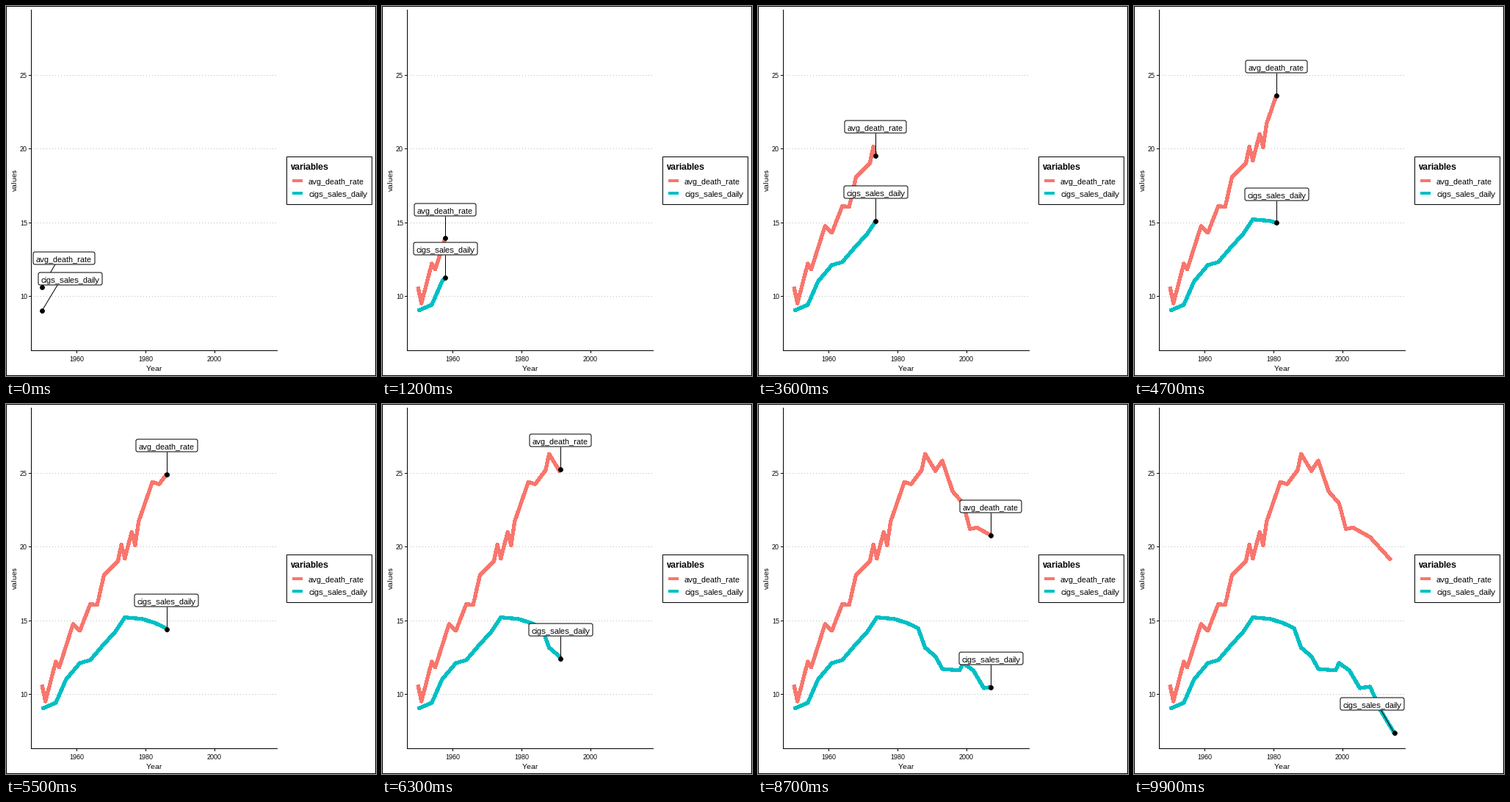
Recreate the animation shown at these times as a matplotlib script. Size 504 by 504 pixels, loop 10000 ms.

```python
import numpy as np
import matplotlib.pyplot as plt
from matplotlib.animation import FuncAnimation
from matplotlib.patches import FancyBboxPatch, Rectangle

plt.rcParams.update({
    "font.family": "Liberation Sans",
    "text.hinting": "native",
    "text.hinting_factor": 1,
    "toolbar": "None",
})

SIZE, FRAMES = 504, 100
RED, TEAL = "#F8766D", "#00BFC4"
START, END = 1950, 2015

# turning points of each curve: (years since START, value)
DEATHS = [(0, 10.6), (1, 9.5), (4, 12.2), (5, 11.8), (9, 14.75), (11, 14.3),
          (14, 16.1), (16, 16.05), (18, 18.1), (22, 19), (23, 20.15),
          (24, 19.2), (26, 21), (27, 20.1), (28, 21.7), (32, 24.4),
          (34, 24.25), (37, 25.2), (38, 26.3), (41, 25.15), (43, 25.85),
          (46, 23.75), (49, 22.95), (51, 21.2), (53, 21.3), (58, 20.65),
          (64, 19.1)]
SALES = [(0, 9), (4, 9.4), (7, 11), (11, 12.1), (14, 12.3), (18, 13.4),
         (21, 14.15), (24, 15.2), (29, 15.1), (33, 14.8), (36, 14.45),
         (38, 13.15), (41, 12.55), (43, 11.7), (48, 11.6), (49, 12.1),
         (52, 11.6), (55, 10.4), (58, 10.5), (61, 8.9), (65, 7.35)]

LEFT, RIGHT = 37, 368       # horizontal limits for the labels
LIFT, HALF_H = 39.3, 8.5    # label height above its dot, half box height
ASPECT = 464 / 336          # panel height over width


def px(year):
    return 96 + (year - 1960) * 4.7


def py(value):
    return 395 - (value - 10) * 20.06


fig = plt.figure(figsize=(SIZE / 72, SIZE / 72), dpi=72, facecolor="white")
ax = fig.add_axes([0, 0, 1, 1])
ax.set(xlim=(0, SIZE), ylim=(SIZE, 0))
ax.axis("off")


def line(x, y, color="black", lw=1, z=1, cap="projecting", **kw):
    return ax.plot(x, y, color=color, lw=lw, zorder=z,
                   solid_capstyle=cap, **kw)[0]


def text(x, y, s, size, ha="center", z=2, **kw):
    kw.setdefault("va", "baseline")
    return ax.text(x, y, s, fontsize=size, ha=ha, zorder=z, **kw)


def frame_box(x, y, w, h):
    ax.add_patch(Rectangle((x, y), w, h, fc="none", ec="black", lw=1))


class Series:
    def __init__(self, name, points, color, width, z):
        years, values = np.transpose(points)
        self.last = START + years[-1]
        self.years = np.arange(START, self.last + 1)
        self.values = np.interp(self.years - START, years, values)
        self.width = width
        self.path = line([], [], color, 4.2, 3, "butt", antialiased=False,
                         solid_joinstyle="round")
        self.dot = line([], [], z=4, marker="o", ms=6, mew=0.8, ls="none")
        self.lead = line([], [], z=5, cap="butt")
        self.box = FancyBboxPatch(
            (0, 0), width, 2 * HALF_H, fc="white", ec="black", lw=1, zorder=z,
            boxstyle="round,pad=0,rounding_size=2.5")
        ax.add_patch(self.box)
        self.label = text(0, 0, name, 11, z=z + 0.5)

    def at(self, year):
        return px(year), py(np.interp(year, self.years, self.values))

    def home(self, year):
        x, y = self.at(year)
        half = self.width / 2
        return [np.clip(x, LEFT + half, RIGHT - half), y - LIFT]

    def draw(self, year, spot):
        alive = year <= self.last + 1e-9
        past = self.years < year
        x, y = self.at(year)
        xs, ys = px(self.years[past]), py(self.values[past])
        if alive:
            xs, ys = np.append(xs, x), np.append(ys, y)
        self.path.set_data(xs, ys)
        for part in (self.dot, self.lead, self.box, self.label):
            part.set_visible(alive)
        if not alive:
            return
        cx, cy = spot
        self.dot.set_data([x], [y])
        left, top = round(cx - self.width / 2), round(cy - HALF_H)
        bottom = top + 2 * HALF_H
        # the leader meets the box between the dot and the box centre
        near = np.clip(x, left, left + self.width)
        drop = y - bottom
        pull = (np.hypot((x - near) * ASPECT, drop)
                / max(np.hypot((cx - x) * ASPECT, drop), 1e-6))
        self.lead.set_data([x, near + (cx - near) * min(pull, 1)], [y, bottom])
        self.box.set_bounds(left, top, self.width, 2 * HALF_H)
        self.label.set_position((left + self.width / 2, top + 14))


def place(year):
    """Label centres, kept clear of each other and of the upper dot."""
    a, b = deaths.home(year), sales.home(year)
    if year > deaths.last:
        return a, b
    dot_x, dot_y = deaths.at(year)
    gap = dot_y - b[1]
    if abs(gap) < 5:
        b[0] = dot_x + 5 + sales.width / 2
    elif 0 < gap < 11:
        b[0] += 7
        b[1] = dot_y - 11
    elif -14 < gap < 0:
        b[1] = dot_y + 14
    overlap = 2 * HALF_H + 1 - (b[1] - a[1])
    if overlap > 0:
        a[1] -= overlap / 2
        b[1] += overlap / 2
    return a, b


# axes and grid
frame_box(0, 0, SIZE - 1, SIZE - 1)
line([34, 34], [5, 469])
line([34, 369], [469, 469])
for v in (10, 15, 20, 25):
    y = round(py(v))
    line([35, 368], [y, y], "#BEBEBE", ls=(0.5, (1, 3)), dash_capstyle="butt")
    line([31, 33], [y, y])
    text(29, y + 4, str(v), 9.4, "right")
for year in (1960, 1980, 2000):
    line([px(year)] * 2, [470, 472])
    text(px(year), 484, str(year), 9.4)
text(202, 497, "Year", 10)
text(17, 236.5, "values", 10, "right", va="center", rotation=90)

# legend
frame_box(382, 205, 116, 65)
text(388, 223, "variables", 12, "left", weight="bold")
for y, name, color in ((238, "avg_death_rate", RED),
                       (255, "cigs_sales_daily", TEAL)):
    line([390, 404], [y, y], color, 4, cap="butt")
    text(412, y + 5, name, 11, "left")

deaths = Series("avg_death_rate", DEATHS, RED, 84, 6)
sales = Series("cigs_sales_daily", SALES, TEAL, 87, 7)


def update(i):
    year = START + (END - START) * i / (FRAMES - 1)
    for series, spot in zip((deaths, sales), place(year)):
        series.draw(year, spot)
    return []


anim = FuncAnimation(fig, update, frames=FRAMES, interval=100,
                     init_func=lambda: update(0), repeat=True, repeat_delay=0)
plt.show()
```
